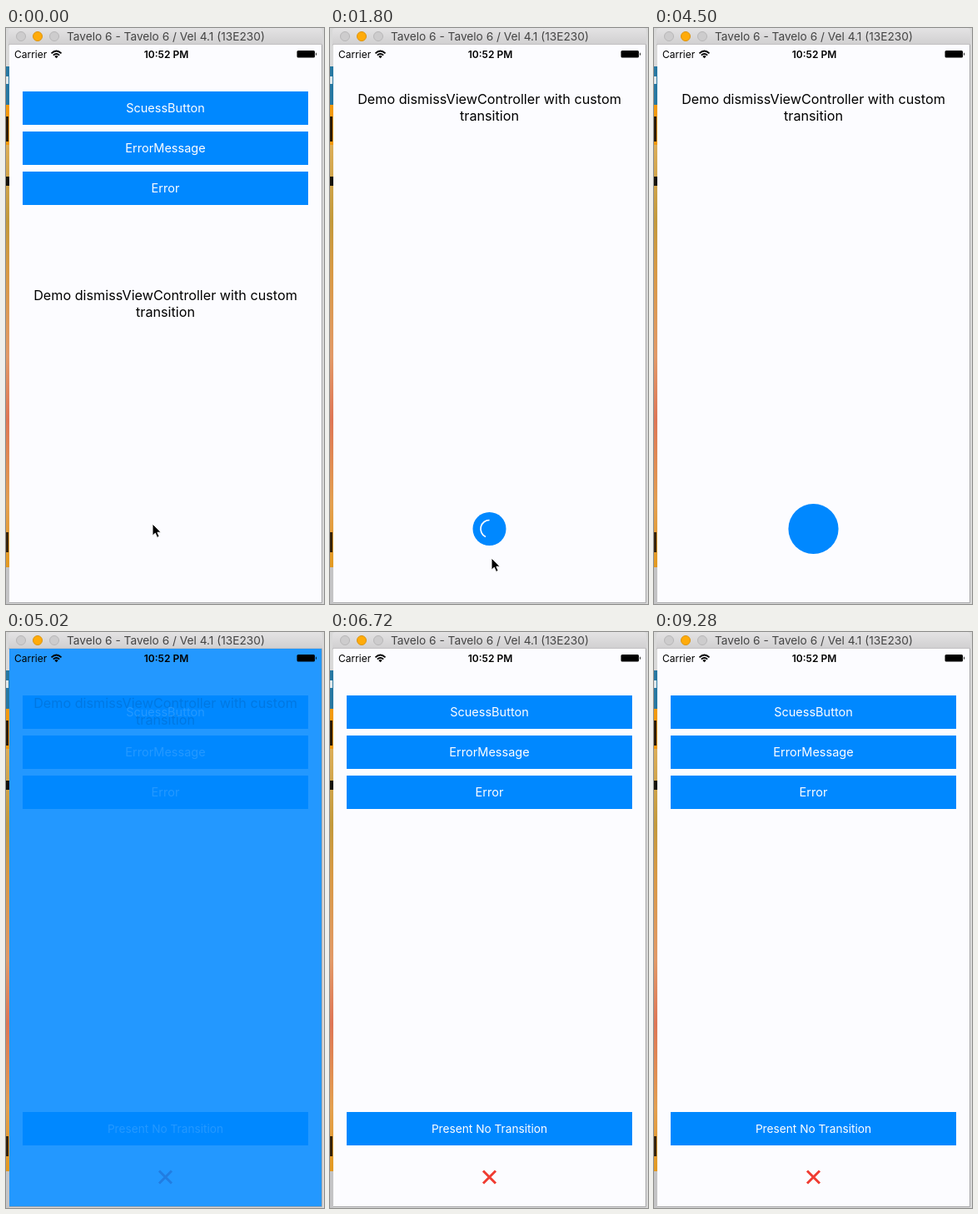
These frames come from a looping animation (382x690 px, 9300 ms). An HTML page:

```html
<!DOCTYPE html>
<html lang="en">
<head>
<meta charset="utf-8">
<title>Button transition</title>
<style>
  html, body { margin: 0; width: 100%; height: 100%; overflow: hidden; }
  svg { display: block; width: 382px; height: 690px; font-family: Inter, "Liberation Sans", sans-serif; }
  .mid { text-anchor: middle; }
  .blue { fill: #0088ff; }
  .caption { fill: #fff; }
  .line { fill: none; stroke: #fff; stroke-width: 1.7; }
</style>
</head>
<body>
<svg viewBox="0 0 382 690">
  <defs>
    <clipPath id="screen"><rect x="4" y="20" width="375" height="668"/></clipPath>
    <linearGradient id="bar" x2="0" y2="1">
      <stop stop-color="#e4e3e4"/><stop offset="1" stop-color="#d0cfd0"/>
    </linearGradient>
    <linearGradient id="photo" x2="0" y2="1">
      <stop stop-color="#dcae58"/><stop offset=".18" stop-color="#c39a3c"/>
      <stop offset=".3" stop-color="#d89a45"/><stop offset=".5" stop-color="#e29a68"/>
      <stop offset=".65" stop-color="#de7656"/><stop offset=".85" stop-color="#e3a050"/>
      <stop offset="1" stop-color="#e39a20"/>
    </linearGradient>
  </defs>

  <!-- desktop behind the window -->
  <rect width="382" height="690" fill="#d9d9d9"/>
  <rect y="46" width="4" height="46" fill="#2778a2"/>
  <rect y="58" width="3" height="9" fill="#dce6ea"/>
  <rect y="92" width="4" height="48" fill="#f39a0c"/>
  <rect y="106" width="3" height="30" fill="#2b1b04"/>
  <rect y="140" width="4" height="506" fill="url(#photo)"/>
  <rect y="178" width="4" height="11" fill="#15120a"/>
  <rect y="604" width="3" height="24" fill="#35220a"/>
  <rect y="646" width="4" height="44" fill="#c4c4c6"/>
  <path d="M379.5 20V688.5H4" fill="none" stroke="#a6a6a8"/>

  <!-- window title bar -->
  <path d="M3 20V4Q3 0 7 0H376Q380 0 380 4V20Z" fill="url(#bar)"/>
  <path d="M3 20H380" stroke="#b2b1b2"/>
  <g stroke="#b8b7b8" fill="#cdcccd">
    <circle cx="18" cy="10" r="5.5"/>
    <circle cx="38" cy="10" r="5.5" fill="#ffab0a" stroke="#dc9410"/>
    <circle cx="58" cy="10" r="5.5"/>
  </g>
  <text x="73" y="15" font-size="13.7" fill="#444">Tavelo 6 - Tavelo 6 / Vel 4.1 (13E230)</text>

  <g clip-path="url(#screen)">
    <rect x="4" y="20" width="375" height="668" fill="#fcfcff"/>
    <g id="home"></g>
    <path d="M184 645.5L199 660.5M199 645.5L184 660.5" stroke="#f03c32" stroke-width="3"/>

    <g id="modal">
      <rect x="4" y="20" width="375" height="668" fill="#fcfcff"/>
      <rect id="pill" class="blue"/>
      <text id="dismiss" class="mid caption" x="191.5" y="605" font-size="14.4">Dismiss</text>
      <path id="spinner" class="line" d="M187 609.5A10.5 10.5 0 0 1 191.5 589.5"/>
      <path id="check" class="line" d="M181.5 601.5L189 609.5L204 594" pathLength="100" stroke-dasharray="100"/>
      <g id="label" class="mid" font-size="16.2">
        <text x="191.5" y="91">Demo dismissViewController with custom</text>
        <text x="191.5" y="111">transition</text>
      </g>
    </g>

    <!-- status bar -->
    <text x="10" y="35.5" font-size="12">Carrier</text>
    <text class="mid" x="192.5" y="35.5" font-size="12" font-weight="600">10:52 PM</text>
    <path d="M54.5 30.3Q60.5 24.7 66.5 30.3M56.8 32.7Q60.5 29.2 64.2 32.7" fill="none" stroke="#000" stroke-width="1.8"/>
    <path d="M58.3 34L60.5 36.2L62.7 34Q60.5 32.2 58.3 34Z"/>
    <rect x="349.5" y="27" width="21.5" height="8.5" rx="1.5"/>
    <path d="M372 29.2Q374 31.2 372 33.3Z"/>
  </g>

  <path id="cursor" d="M0 0V14.2L3.3 11.2L5.6 16.4L8.2 15.2L5.9 10.2H10.3Z" stroke="#fff"/>
</svg>
<script>
const LOOP = 9300;
const CENTER = { x: 191.5, y: 600 };
const el = id => document.getElementById(id);
const set = (id, attrs) => {
  for (const name in attrs) el(id).setAttribute(name, attrs[name]);
};
const progress = (t, from, to) => Math.min(1, Math.max(0, (t - from) / (to - from)));
const mix = (a, b, p) => a + (b - a) * p;
const smooth = p => p * p * (3 - 2 * p);

el('home').innerHTML = [
  ['ScuessButton', 76, 14.5],
  ['ErrorMessage', 124, 14.5],
  ['Error', 172, 14.5],
  ['Present No Transition', 575, 13.7]
].map(([text, y, size]) =>
  `<rect class="blue" x="20" y="${y}" width="343" height="40"/>
   <text class="mid caption" x="191.5" y="${y + 25.2}" font-size="${size}">${text}</text>`
).join('');

// Critically damped spring, already under way when the loop starts.
function slideOffset(t) {
  const k = 18.26 * (t / 1000 + 0.12);
  return 668 * (1 + k) * Math.exp(-k);
}

function drawPill(t) {
  const shrink = smooth(progress(t, 1150, 1350));
  const grow = progress(t, 4450, 4850) ** 2;
  const halfHeight = mix(20, 640, grow);
  const halfWidth = grow ? halfHeight : mix(171.5, 20, shrink);
  set('pill', {
    x: CENTER.x - halfWidth, y: CENTER.y - halfHeight,
    width: 2 * halfWidth, height: 2 * halfHeight,
    rx: halfHeight * shrink
  });
  set('dismiss', { opacity: t < 1150 ? 1 : 0 });
}

function drawCursor(t) {
  const move = smooth(progress(t, 1200, 1700));
  const leave = smooth(progress(t, 2200, 2900));
  const x = mix(176, 194, move) + 30 * leave;
  const y = mix(594, 635, move) + 70 * leave;
  set('cursor', { transform: `translate(${x} ${y})`, opacity: t < 2900 ? 1 : 0 });
}

function render(t) {
  set('modal', {
    transform: `translate(0 ${slideOffset(t)})`,
    opacity: 1 - progress(t, 4950, 5450)
  });
  set('label', { opacity: mix(1, 0.13, progress(t, 4700, 4900)) });
  drawPill(t);
  set('spinner', {
    opacity: t >= 1350 && t < 3700 ? 1 : 0,
    transform: `rotate(${(t - 1800) * 0.36} ${CENTER.x} ${CENTER.y})`
  });
  set('check', {
    opacity: t >= 3700 && t < 4450 ? 1 : 0,
    'stroke-dashoffset': 100 * (1 - progress(t, 3700, 4000))
  });
  drawCursor(t);
}

const start = performance.now();
function tick() {
  render((performance.now() - start) % LOOP);
  requestAnimationFrame(tick);
}
tick();
</script>
</body>
</html>
```
